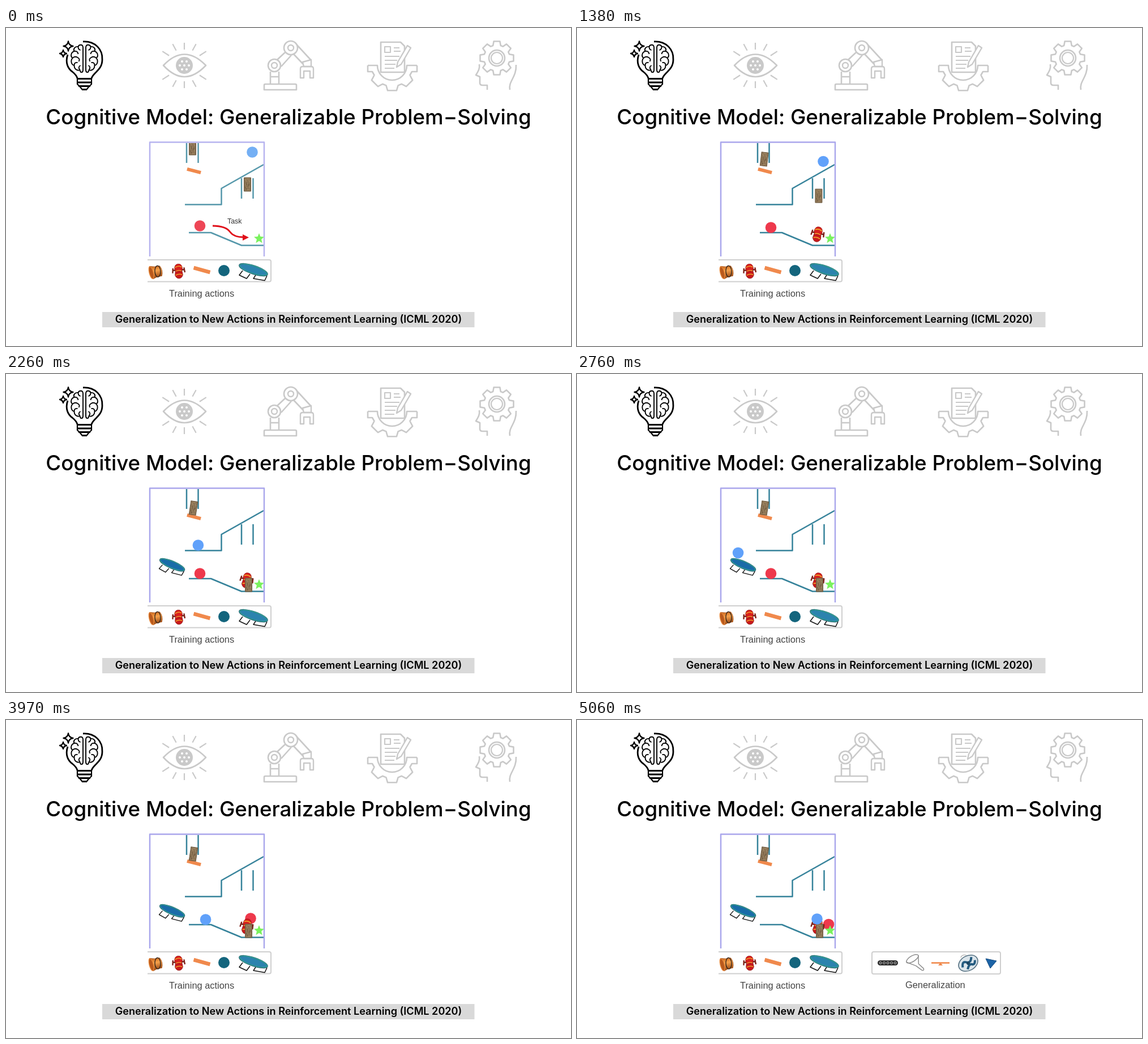
Animation, 998 px wide and 561 px high, one loop 5100 ms. Source, as an HTML page with a canvas:

```html
<!DOCTYPE html>
<html lang="en">
<head>
<meta charset="utf-8">
<title>Generalizable Problem-Solving</title>
<style>
html, body { margin: 0; width: 100%; height: 100%; overflow: hidden; background: #fff; }
canvas { display: block; width: 998px; height: 561px; }
</style>
</head>
<body>
<canvas id="stage"></canvas>
<script>
const W = 998, H = 561, LOOP = 5100;
const canvas = document.getElementById('stage');
const ratio = window.devicePixelRatio || 1;
canvas.width = W * ratio;
canvas.height = H * ratio;
const ctx = canvas.getContext('2d');
const GREY = '#c9c9c9', RED = '#e0101a', ORANGE = '#f0894c';

const clamp = v => Math.max(0, Math.min(1, v));
const ramp = (t, a, b) => clamp((t - a) / (b - a));

function line(d, color, width) {
  ctx.strokeStyle = color;
  ctx.lineWidth = width;
  ctx.stroke(new Path2D(d));
}
function shape(d, fill, stroke, width = 1) {
  const p = new Path2D(d);
  if (fill) { ctx.fillStyle = fill; ctx.fill(p); }
  if (stroke) { ctx.strokeStyle = stroke; ctx.lineWidth = width; ctx.stroke(p); }
}
function oval(x, y, rx, ry, angle, fill, stroke, width = 1) {
  ctx.beginPath();
  ctx.ellipse(x, y, rx, ry, angle, 0, 7);
  if (fill) { ctx.fillStyle = fill; ctx.fill(); }
  if (stroke) { ctx.strokeStyle = stroke; ctx.lineWidth = width; ctx.stroke(); }
}
const disc = (x, y, r, fill) => oval(x, y, r, r, 0, fill);
const ring = (x, y, r, color, width) => oval(x, y, r, r, 0, null, color, width);

function box(x, y, w, h, r, fill, stroke, width) {
  ctx.beginPath();
  ctx.roundRect(x, y, w, h, r);
  if (fill) { ctx.fillStyle = fill; ctx.fill(); }
  if (stroke) { ctx.strokeStyle = stroke; ctx.lineWidth = width; ctx.stroke(); }
}
function text(s, x, y, font, color, align = 'left') {
  ctx.font = font;
  ctx.fillStyle = color;
  ctx.textAlign = align;
  ctx.fillText(s, x, y);
}
function place(x, y, angle, scale, draw) {
  ctx.save();
  ctx.translate(x, y);
  ctx.rotate(angle);
  ctx.scale(scale, scale);
  draw();
  ctx.restore();
}
function faded(alpha, draw) {
  if (alpha <= 0) return;
  ctx.save();
  ctx.globalAlpha = alpha;
  draw();
  ctx.restore();
}

// Keys are [time, x, y, x power, y power]; the powers shape the way in.
function track(keys, t) {
  if (t <= keys[0][0]) return keys[0].slice(1, 3);
  for (let i = 1; i < keys.length; i++) {
    const [end, x, y, px = 1, py = 1] = keys[i];
    if (t > end) continue;
    const [start, x0, y0] = keys[i - 1];
    const u = (t - start) / (end - start);
    return [x0 + (x - x0) * u ** px, y0 + (y - y0) * u ** py];
  }
  return keys[keys.length - 1].slice(1, 3);
}

function gear(cx, cy, inner, outer, teeth, from, to, color) {
  const step = 2 * Math.PI / teeth;
  ctx.beginPath();
  for (let a = from; a < to - 0.01; a += step) {
    [[0.12, inner], [0.27, outer], [0.73, outer], [0.88, inner]].forEach(([f, r]) =>
      ctx.lineTo(cx + r * Math.cos(a + f * step), cy + r * Math.sin(a + f * step)));
  }
  if (to - from > 6) ctx.closePath();
  ctx.strokeStyle = color;
  ctx.lineWidth = 2.6;
  ctx.stroke();
}

function sparkle(x, y, r) {
  shape(`M${x} ${y - r}Q${x + 1} ${y - 1} ${x + r} ${y}Q${x + 1} ${y + 1} ${x} ${y + r}` +
    `Q${x - 1} ${y + 1} ${x - r} ${y}Q${x - 1} ${y - 1} ${x} ${y - r}Z`, '#fff', '#000', 2.3);
}
function halfBrain() {
  line('M-2.500 -20C-3 -26 -10 -25 -11 -21C-17 -22 -20 -17 -18 -13C-24 -11 -25 -4 -21 -1' +
    'C-25 4 -23 11 -18 12C-18 19 -12 22 -8 20C-7 26 -2.500 25 -2.500 20Z' +
    'M-11 -21q0 5 4 6M-18 -13q6 -1 7 5M-21 -1q4 -4 9 -1t2 7M-18 12q0 -6 6 -5' +
    'M-8 20q-4 -5 1 -8', '#000', 1.9);
}
function bulbIcon() {
  line('M136 24C158 23 171 38 170 56C170 68 163 74 158 79C154 83 152 85 151 89' +
    'M109 47C104 62 110 72 117 77C122 81 125 84 126 89', '#000', 2.8);
  line('M125.500 89.500H151.500M126 96H151M128 102.500H149M134 108.500H143', '#000', 3);
  line('M126 89V99L131 104L135 109H142L146 104L151 99V89', '#000', 2.2);
  place(138.5, 54, 0, 1, halfBrain);
  ctx.save();
  ctx.translate(138.5, 54);
  ctx.scale(-1, 1);
  halfBrain();
  ctx.restore();
  sparkle(110, 32, 8.5);
  sparkle(101, 45, 6);
}
function eyeIcon() {
  line('M278 66Q315 27 353 66Q315 106 278 66Z', GREY, 2.6);
  disc(315, 66, 15, GREY);
  for (let i = 0; i < 7; i++) {
    const a = i * Math.PI / 3, r = i ? 8 : 0;
    disc(315 + r * Math.cos(a), 66 + r * Math.sin(a), 2, '#fff');
  }
  for (let i = -2; i <= 2; i++) {
    const a = i * 0.5, s = Math.sin(a), c = Math.cos(a);
    for (const side of [-1, 1]) {
      const r1 = 28 + Math.abs(i) * 2, r2 = 40 + Math.abs(i) * 3;
      line(`M${315 + r1 * s} ${66 + side * r1 * c}L${315 + r2 * s} ${66 + side * r2 * c}`, GREY, 2.2);
    }
  }
}
function armIcon() {
  line('M456 109V101Q456 99 458 99H511Q513 99 513 101V109ZM467 99V77M482 99V77M467 86H482' +
    'M479 56L493 43M486 68L504 48M514 30L539 57M508 46L527 66', GREY, 2.6);
  for (const [x, y, r] of [[474, 66, 11], [503, 35, 12]]) {
    disc(x, y, r, '#fff');
    ring(x, y, r, GREY, 2.6);
    ring(x, y, 5, GREY, 2.4);
  }
  shape('M524 60L539 56L539 68H526Z', '#fff', GREY, 2.4);
  line('M520 88V72Q520 68 524 68H539Q543 68 543 72V88H537V76H526V88Z', GREY, 2.4);
}
function paperIcon() {
  gear(682, 67, 36, 44, 8, Math.PI / 8, Math.PI * 7 / 8, GREY);
  line('M639 66H656A26 26 0 0 0 708 66H726M639 66V77H647L651 84M726 66V77H717L713 84', GREY, 2.6);
  shape('M662 25H697L704 32V78H662Z', '#fff', GREY, 2.6);
  line('M669 33H679V43H669ZM685 35H695M685 41H697M669 50H695M669 57H691M669 64H688M669 71H686', GREY, 2.2);
  shape('M692 60L709 31L715 35L698 64L690 69Z', '#fff', GREY, 2.4);
}
function headIcon() {
  gear(867, 53, 23, 30, 8, Math.PI / 8, Math.PI * 2 + Math.PI / 8, GREY);
  ring(867, 53, 14, GREY, 2.6);
  ring(867, 53, 10, GREY, 2.2);
  line('M836 64C837 71 835 75 830 83L837 86V97Q837 101 842 101H850V109' +
    'M890 109C887 94 902 87 901 65', GREY, 2.6);
}

function block(x, y, angle = 0) {
  place(x, y, angle, 1, () => {
    box(-6, -12, 12, 24, 0, '#8b7354', '#6b583f', 1);
    line('M-4 -9L-1 -5M2 -8L4 -4M-4 0L0 -2M2 2L4 6M-4 7L-1 5M-1 10L3 9M-2 -10H3', '#a98f69', 1);
    line('M-2 -3V1M3 -1L1 4M-4 4L-2 9', '#5f4d37', 0.9);
  });
}
function plank(x, y, w, h, angle) {
  place(x, y, angle, 1, () => box(-w / 2, -h / 2, w, h, 0, ORANGE));
}
function trampoline(x, y, angle, scale, fill) {
  place(x, y, angle, scale, () => {
    shape('M-19 0L-25 8L-12 14L-6 6', '#fff', '#111', 1.5);
    shape('M4 8L0 14L20 17.500L24 9', '#fff', '#111', 1.5);
    oval(0, -1.5, 26, 7, 0.32, fill, '#174f66', 2.2);
    oval(0, -1.7, 25.5, 6.6, 0.32, null, '#35a899', 1.4);
  });
}
function cannon(x, y, angle, scale) {
  place(x, y, angle, scale, () => {
    line('M-10 -2H10', '#6d211b', 2.5);
    line('M-10 -6L-11 3M10 -6L11 3', '#7d2018', 2.4);
    shape('M-6 0L-7 7Q-5 13 0 13Q5 13 7 7L6 0Z', '#c9191c', '#8e1515', 0.8);
    shape('M-7 -4Q-7 -13 0 -13Q7 -13 7 -4L5 1H-5Z', '#d8201d', '#9c1515', 0.8);
    line('M-6 -7Q0 -11 6 -7M-6 7Q0 4 6 7', '#f0a52c', 1.6);
    line('M-5 0Q0 -3 5 0', '#f2c23a', 1.2);
  });
}
function bucket() {
  place(264, 430, -0.15, 1, () => {
    const g = ctx.createLinearGradient(0, -11, 2, 12);
    g.addColorStop(0, '#c9651a');
    g.addColorStop(0.4, '#f6a24c');
    g.addColorStop(1, '#8e3e0d');
    shape('M-9 -11Q0 -8 9 -9Q14 0 10 9Q2 8 -6 12Z', g, '#a44e14', 0.8);
    oval(-7.5, 0.5, 3.6, 11, -0.1, '#b8591d', '#e8893b', 1.3);
    oval(4, 0, 5, 10, 0.1, null, '#2b211b', 1.3);
  });
}
function star(x, y, r) {
  ctx.beginPath();
  for (let i = 0; i < 10; i++) {
    const a = i * Math.PI / 5 - Math.PI / 2, q = i % 2 ? r * 0.45 : r;
    ctx.lineTo(x + q * Math.cos(a), y + q * Math.sin(a));
  }
  ctx.closePath();
  ctx.fillStyle = '#7af25e';
  ctx.fill();
}

const LABEL = '"Liberation Sans", Arial, sans-serif';

function header() {
  bulbIcon();
  eyeIcon();
  armIcon();
  paperIcon();
  headIcon();
  text('Cognitive Model: Generalizable Problem\u2212Solving', 499, 170,
    '500 36.7px Inter, sans-serif', '#000', 'center');
  box(170, 501, 657.5, 27, 0, '#d9d9d9');
  text('Generalization to New Actions in Reinforcement Learning (ICML 2020)', 499, 520,
    '600 18.1px Inter, sans-serif', '#000', 'center');
}

function toolbar(glow) {
  line('M250 409H465Q468 409 468 412V444.500Q468 447.500 465 447.500H250', '#cfcfcf', 2);
  faded(glow, () => {
    ctx.shadowColor = '#f6ee70';
    ctx.shadowBlur = 4 * ratio;
    box(325, 413, 42, 27, 4, '#f8f18a');
    ctx.shadowBlur = 0;
    box(330, 417, 32, 18, 2, '#fffde6');
    line('M331 416H361', '#f3d75e', 1.5);
  });
  bucket();
  cannon(305, 429, -0.08, 0.98);
  plank(346, 427, 30, 6.5, 0.27);
  disc(385, 428, 10, '#14657d');
  trampoline(437, 428, 0, 1, '#2c83ae');
  text('Training actions', 288, 474, '16.4px ' + LABEL, '#444');
}

function newTools() {
  box(521, 409, 227, 39, 3, '#fff', '#cfcfcf', 2);
  box(531, 424, 36, 9, 4.5, '#2b2b2b');
  for (let i = 0; i < 5; i++) ring(536 + i * 6.5, 428.5, 2, '#c8c8c8', 1);
  place(595, 427, -0.1, 1, () => {
    oval(-2, -6, 12, 5, -0.45, '#fff', '#8d8d8d', 1.5);
    line('M-13 -1L3 7L13 16Q17 17 16 13L8 4L9 -11', '#8d8d8d', 1.5);
  });
  line('M626 428.500H658', ORANGE, 2.6);
  shape('M642 428L646 433H638Z', ORANGE);
  place(691, 429, -0.5, 1, () => {
    oval(0, 0, 18, 13, 0, '#dbe5eb', '#536f80', 1.6);
    line('M-12 2Q-8 -9 -2 -3T10 -7M-6 9Q1 1 5 5T13 1', '#245b80', 4);
    disc(0, 0, 3, '#1d4663');
  });
  line('M678 419Q680 413 688 415', '#a5a5a5', 1.2);
  shape('M722 421L741 425L730 438Z', '#1c63a6', '#164d82', 1);
  text('Generalization', 580, 473, '16.4px ' + LABEL, '#444');
}

const bluePath = [
  [1260, 435, 219], [1400, 435, 241, 1, 2], [1720, 402, 259, 1.4, 1.4],
  [1920, 378, 273], [2120, 352, 302, 1, 2], [2500, 318, 302], [2760, 284.5, 316, 1, 2],
  [2920, 296, 306, 1, 0.6], [3180, 322, 344, 1, 2], [3380, 315, 330, 1, 0.6],
  [3550, 319.5, 334, 1, 2], [3700, 334, 352, 1, 2], [3970, 352.5, 352], [4150, 364, 352],
  [4450, 398, 366, 1.3, 1.3], [4600, 412, 353, 1, 0.7], [4760, 424, 351]
];
const redPath = [
  [1230, 342.5, 349], [1300, 342.5, 352], [3180, 342.5, 352], [3330, 364, 352],
  [3550, 390, 362], [3720, 408, 369], [3860, 422, 352, 1, 0.6], [3970, 432, 350],
  [4220, 444.5, 360.5, 1, 2]
];

function world(t) {
  const paused = t < 1090;
  const wall = paused ? '#5497aa' : '#35829a';
  const [rx, ry] = track(redPath, t);
  const [bx, by] = track(bluePath, t);

  line('M319 203V238M339.500 203V238M416 265V301M436.500 265V301', wall, 2.5);
  line('M316 311.500H380.500V283L455 241M323 361H362L416 383.500H455', wall, 2.5);
  disc(rx, ry, 9.8, paused ? '#ee4656' : '#ee394c');

  if (t >= 1250) cannon(425, 364, 0.22, 1.02);
  plank(332, 252, 25, 6, 0.26);
  ctx.save();
  ctx.beginPath();
  ctx.rect(254, 203, 202, 200);
  ctx.clip();
  const left = ramp(t, 1230, 1400) ** 2, right = ramp(t, 1230, 1560) ** 2;
  block(329.5 + left * 1.5, 212 + left * 24.5, left * 0.15);
  block(426.5 + right * 2, 276 + right * 96);
  ctx.restore();

  if (t >= 2260) trampoline(293.5, 338, 0.08, 0.9, '#1a6ca8');
  disc(bx, by, 9.8, paused ? '#74aff4' : '#60a1fa');
  star(447, 371.5, 9.5);
  line('M254 403V201.500H456V403', paused ? '#b7b4ef' : '#aaa7ec', 2.5);
}

function taskHint() {
  text('Task', 391, 344.5, '12.4px ' + LABEL, '#333');
  line('M365 349C380 349 391 353 396 360S410 369 420 369', RED, 2.8);
  shape('M418 364L429 369.500L418 375Z', RED);
}
function actionHint() {
  text('Action', 269, 237.5, '12.6px ' + LABEL, '#333');
  line('M274 249H298', RED, 2.8);
  shape('M296 244L306 249L296 254Z', RED);
}

function render(t) {
  ctx.setTransform(ratio, 0, 0, ratio, 0, 0);
  ctx.fillStyle = '#fff';
  ctx.fillRect(0, 0, W, H);
  ctx.lineJoin = 'round';
  header();
  const hint = t < 1090 ? ramp(t, 340, 590) : 0;
  toolbar(hint);
  world(t);
  faded(1 - ramp(t, 170, 340), taskHint);
  faded(hint, actionHint);
  faded(ramp(t, 4590, 4850), newTools);
}

const begin = performance.now();
function tick() {
  render((performance.now() - begin) % LOOP);
  requestAnimationFrame(tick);
}
tick();
</script>
</body>
</html>
```
